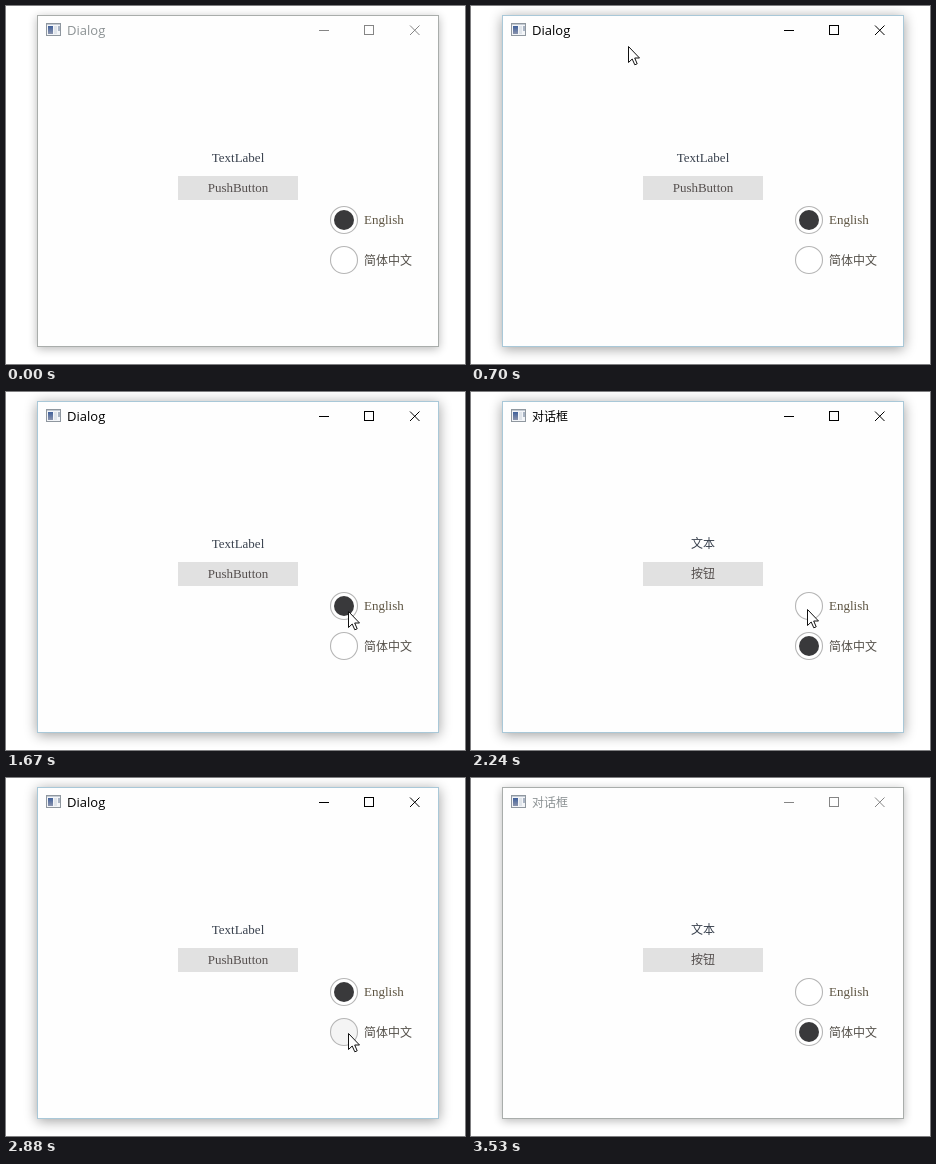
An HTML page for the animation above (3600 ms loop, 459 by 358 pixels).

```html
<!DOCTYPE html>
<html lang="en">
<head>
<meta charset="utf-8">
<title>Dialog language switch</title>
<style>
  html, body { margin: 0; width: 100%; height: 100%; overflow: hidden; background: #fff; }
  svg { display: block; width: 100%; height: 100%; }
  .ui { font: 13px "Liberation Serif", "Noto Serif", serif; }
  .cap { font: 13px "Open Sans", "Noto Sans", sans-serif; }
  .zh { font: 12px "Noto Sans CJK SC", "Noto Sans CJK", sans-serif; }
  .mid { text-anchor: middle; }
  .ring { stroke: #b6b6b6; stroke-width: 1.1; }
  .dot { fill: #39393b; }
</style>
</head>
<body>
<svg viewBox="0 0 459 358">
  <defs>
    <filter id="blur" x="-20%" y="-20%" width="140%" height="140%">
      <feGaussianBlur id="spread"/>
    </filter>
    <linearGradient id="pane" x1="0" y1="0" x2="0" y2="1">
      <stop offset="0" stop-color="#3f5f9a"/>
      <stop offset="1" stop-color="#8a93ad"/>
    </linearGradient>
  </defs>
  <rect id="shadow" x="31" y="11" width="402" height="332" filter="url(#blur)"/>
  <rect id="frame" x="31.5" y="9.5" width="401" height="331" fill="#fefefe"/>

  <g id="icon">
    <rect x="40.5" y="17.5" width="14" height="12" fill="#f3f5f8" stroke="#8f979f"/>
    <path d="M41 18.5H54" stroke="#c3cad3"/>
    <rect x="42" y="20" width="5" height="8" fill="url(#pane)"/>
    <rect x="48" y="20" width="3" height="8" fill="#dfe4ea"/>
    <rect x="52" y="20" width="2" height="5" fill="#a9b4c4"/>
  </g>
  <text id="title" x="61" y="29"></text>
  <g id="controls" fill="none">
    <path d="M313 24.5H323" shape-rendering="crispEdges"/>
    <rect x="358.5" y="19.5" width="9" height="9" shape-rendering="crispEdges"/>
    <path d="M404 19.5L413.5 29M413.5 19.5L404 29"/>
  </g>

  <text id="label" x="232" y="156" fill="#38404d"></text>
  <rect x="172" y="170" width="120" height="24" fill="#e1e1e1"/>
  <text id="button" x="232" y="186" fill="#56504f"></text>

  <circle id="ring0" class="ring" cx="338" cy="214" r="13.5"/>
  <circle id="dot0" class="dot" cx="338" cy="214" r="10"/>
  <text class="ui" x="358" y="218" fill="#5d5442">English</text>
  <circle id="ring1" class="ring" cx="338" cy="254" r="13.5"/>
  <circle id="dot1" class="dot" cx="338" cy="254" r="10"/>
  <text class="zh" x="358" y="258.5" fill="#54504a">简体中文</text>

  <path id="cursor" d="M.5 .5V16.5L4.2 13L6.8 18.8L9.2 17.8L6.7 12H11.5Z"
        fill="#fff" stroke="#111" stroke-linejoin="round"/>
</svg>
<script>
const LOOP = 3600, TICK = 64.3, LEAD = 14;
const $ = id => document.getElementById(id);
const smooth = u => u * u * (3 - 2 * u);
const settle = u => 1 - (1 - u) ** 2.4;

// Each stop: arrival tick, place, easing on the way there
const stop = (at, x, y, ease = smooth) => ({ at, x, y, ease });
const route = [
  stop(1, 342, 316),
  stop(9, 152, 32, settle),   // to the title bar
  stop(10, 152, 32),
  stop(18, 261, 219),
  stop(20, 238, 228),
  stop(24, 349, 194),
  stop(26, 342, 219),
  stop(30, 338, 246),         // Chinese option
  stop(35, 336, 217, settle), // English option
  stop(40, 336, 216),
  stop(45, 342, 255),         // Chinese option again
  stop(51, 394, 348)          // out of the window
];
const strings = [
  { title: "Dialog", label: "TextLabel", button: "PushButton" },
  { title: "对话框", label: "文本", button: "按钮" }
];

function pointer(k) {
  const i = route.findIndex(s => s.at > k);
  if (i < 1) return null;
  const a = route[i - 1], b = route[i];
  const u = b.ease((k - a.at) / (b.at - a.at));
  return [a.x + (b.x - a.x) * u, a.y + (b.y - a.y) * u].map(Math.round);
}

function setText(id, lang, latin) {
  const el = $(id);
  el.textContent = strings[lang][id];
  el.setAttribute("class", (lang ? "zh" : latin) + (id === "title" ? "" : " mid"));
}

function draw(t) {
  const k = Math.floor((t + LEAD) / TICK);
  const active = k >= 10 && k < 55;
  const lang = (k >= 31 && k < 40) || k >= 46 ? 1 : 0;
  const pressed = k === 39 ? 0 : k === 30 || k === 45 ? 1 : -1;

  $("shadow").setAttribute("opacity", active ? .38 : .28);
  $("spread").setAttribute("stdDeviation", active ? 6.5 : 5);
  $("frame").setAttribute("stroke", active ? "#a9c8d8" : "#a9adab");
  $("title").setAttribute("fill", active ? "#000" : "#8c9294");
  $("controls").setAttribute("stroke", active ? "#000" : "#858585");
  setText("title", lang, "cap");
  setText("label", lang, "ui");
  setText("button", lang, "ui");

  for (const n of [0, 1]) {
    $("dot" + n).setAttribute("visibility", n === lang ? "visible" : "hidden");
    $("ring" + n).setAttribute("fill", n === pressed ? "#f4f4f4" : "#fff");
  }

  const p = pointer(k);
  $("cursor").setAttribute("visibility", p ? "visible" : "hidden");
  if (p) $("cursor").setAttribute("transform", `translate(${p})`);
}

const start = performance.now();
function loop() {
  draw((performance.now() - start) % LOOP);
  requestAnimationFrame(loop);
}
loop();
</script>
</body>
</html>
```
